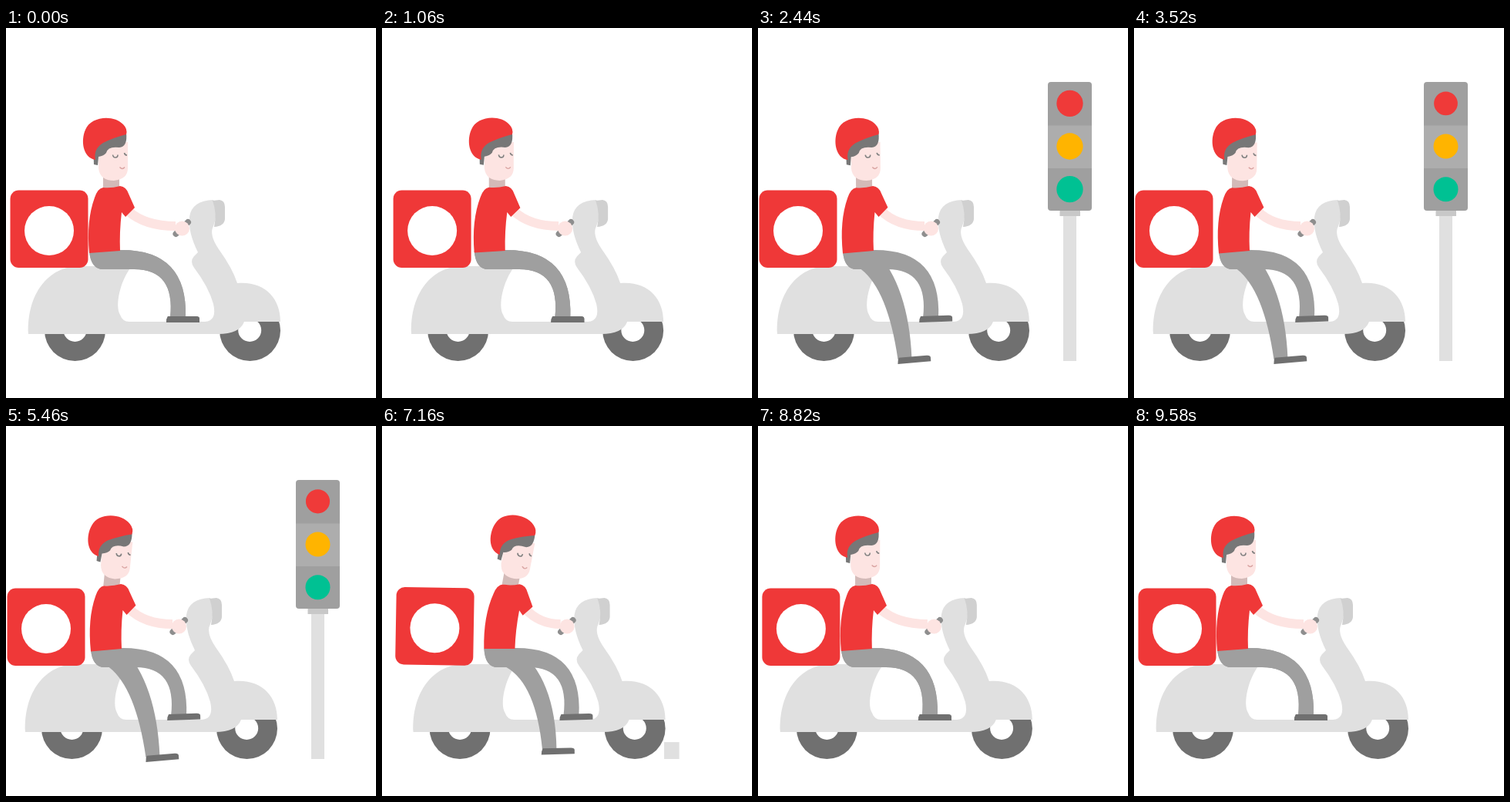
Recreate the animation shown at these times as an HTML page. Size 480 px wide and 480 px high, loop 9.6 s.

```html
<!DOCTYPE html>
<html lang="en">
<head>
<meta charset="utf-8">
<title>Delivery scooter</title>
<style>
  html, body { margin: 0; width: 100%; height: 100%; overflow: hidden; background: #fff; }
  svg { display: block; width: 100%; height: 100%; }
</style>
</head>
<body>
<svg viewBox="0 0 480 480">
  <g id="light">
    <rect id="pole" fill="#e0e0e0"/>
    <rect id="collar" x="-13" width="26.5" fill="#c8c8c8"/>
    <rect id="housing" x="-28.5" width="57" rx="4" fill="#9f9f9f"/>
    <rect id="middle" x="-28.5" width="57" fill="#adadad"/>
    <circle id="red" fill="#ef3a39"/>
    <circle id="amber" fill="#ffb400"/>
    <circle id="green" fill="#00c193"/>
  </g>

  <g id="scooter">
    <g id="wheels">
      <circle cx="89.5" cy="392.5" r="39.5" fill="#707070"/>
      <circle cx="89.5" cy="392" r="15" fill="#fff"/>
      <circle cx="316.5" cy="392.5" r="39.5" fill="#707070"/>
      <circle cx="316.2" cy="392" r="15" fill="#fff"/>
    </g>
    <g id="frame">
      <path fill="#e0e0e0" d="M29 397C27 345 55 309 95 309H163C148 328 141 360 148 372Q151 381 160 381H258Q274 380 269 358Q263 336 244 311Q238 303 244 296L249 291Q236 265 238 245Q241 224 269 223Q276 240 269 257Q263 268 276 287Q294 312 300 331C335 328 356 350 356 381H309Q303 397 275 397Z"/>
      <path fill="#d0d0d0" d="M268 224L277 223Q284 224 284 232V248Q283 257 270 258Q274 240 268 224Z"/>
      <g id="box">
        <rect x="5.500" y="210.500" width="101" height="100.500" rx="11" fill="#ef3838"/>
        <circle cx="56" cy="263" r="32" fill="#fff"/>
      </g>
      <path d="M220.500 267L236 252" stroke="#8e8e8e" stroke-width="8" stroke-linecap="round"/>
      <path id="arm" fill="none" stroke="#fde4e2" stroke-width="12"/>
      <circle cx="228.500" cy="260" r="9.500" fill="#fde4e2"/>
      <g id="rider">
        <g id="legs">
          <path id="groundLeg" fill="#9f9f9f"/>
          <path id="boardLeg" fill="#9f9f9f"/>
          <path id="groundShoe" fill="#707070" d="M0 6Q0 1 2 -2H38Q43 -2 43 1V6Z"/>
          <path id="boardShoe" fill="#707070" d="M0 6Q0 1 2 -2H38Q43 -2 43 1V6Z"/>
        </g>
        <g id="upperBody">
          <g id="head">
            <path fill="#d3bab8" d="M126 190H147V208H126Z"/>
            <path fill="#fde4e2" d="M120 160V182Q122 198 140 198Q158 196 158 182V148H130Z"/>
            <path fill="#777" d="M114 177Q112 160 122 145L156 136Q158 154 147 155Q132 153 130 162Q127 166 120 167L119 178Z"/>
            <path fill="#ef3838" d="M116 171C99 168 97 145 103 132C110 114 140 112 152 125Q158 131 156 138Q140 142 126 149Q113 157 116 171Z"/>
            <path fill="none" stroke="#808080" stroke-width="1.6" d="M138.500 164.500Q139 168 142 168Q145 168 145 164.500M153.500 162Q154 165 157 165"/>
            <path fill="none" stroke="#d9a3a1" stroke-width="1.4" d="M147.500 180.500Q151 184.500 154 180.500"/>
          </g>
          <path fill="#ef3838" d="M126 207Q137 208 148 205Q156 206 159 215L167 233L155 245L150 239Q147 265 148 289L108 292Q104 250 115 220Q119 208 126 207Z"/>
        </g>
      </g>
    </g>
  </g>
</svg>
<script>
const LOOP = 9600, GROUND = 432, POLE = 195, HOUSING = 167;
const $ = id => document.getElementById(id);
const set = (id, attrs) => {
  for (const name in attrs) $(id).setAttribute(name, attrs[name]);
};

const clamp = (v, low, high) => Math.min(high, Math.max(low, v));
const mix = (a, b, u) => a + (b - a) * u;
const progress = (t, start, end) => clamp((t - start) / (end - start), 0, 1);
const smooth = u => u * u * (3 - 2 * u);
const backIn = (u, pull) => u * u * ((pull + 1) * u - pull);
const backOut = (u, pull) => 1 - backIn(1 - u, pull);

// Rises from 0 to 1 between a and b, falls back between c and d.
const phase = (t, a, b, c, d) => smooth(progress(t, a, b)) - smooth(progress(t, c, d));

function drawLight(t) {
  const arrival = (1 - progress(t, 1300, 2190)) ** 2;
  const departure = Math.max(0, t - 6700) ** 2 * 0.000135;
  const rise = 1 - (1 - progress(t, 1300, 2050)) ** 2;
  const poleHeight = POLE * rise * (1 - backIn(progress(t, 6150, 7185), 2));
  const head = HOUSING * backOut(progress(t, 1780, 2400), 1) * (1 - backIn(progress(t, 6100, 7000), 2));
  const base = GROUND - poleHeight;
  const width = 20 - 3 * clamp(poleHeight / POLE, 0, 1);
  const middle = clamp(head - 55, 0, 55.5);

  set('light', { transform: `translate(${404.5 + 60 * arrival - departure})` });
  set('pole', { x: -width / 2, y: base, width, height: poleHeight });
  set('collar', { y: base, height: head > 0 ? 7 : 0 });
  set('housing', { y: base - head, height: head });
  set('middle', { y: base - 55 - middle, height: middle });

  const radius = 16 * backOut(progress(t, 2150, 2550), 1.7) * (1 - smooth(progress(t, 6250, 6600)));
  const beat = 1.2 + 2.3 * Math.sin(2 * Math.PI * (t - 3520) / 960 - 0.93);
  set('red', { cy: base - head * 5 / 6, r: Math.max(0, radius + beat * phase(t, 2600, 2900, 5900, 6100)) });
  set('amber', { cy: base - head / 2, r: radius });
  set('green', { cy: base - head / 6, r: radius });
}

// The same leg bends on the board (0) or stretches down to the ground (1).
function leg(u) {
  const at = (x0, y0, x1, y1) => `${mix(x0, x1, u)} ${mix(y0, y1, u)}`;
  return `M108 289L150 288Q${at(236, 288, 194, 335)} ${at(233, 376, 199, 429)}` +
    `L${at(213, 376, 181, 430)}Q${at(220, 311, 167, 340)} ${at(163, 313, 132, 313)}` +
    'L126 313Q110 313 108 289Z';
}

function drawScooter(t) {
  const brake = phase(t, 1450, 1900, 1900, 2300);
  const lurch = phase(t, 800, 1820, 1820, 2300);
  const surge = phase(t, 6800, 7600, 7750, 8160);
  const parked = phase(t, 1525, 2300, 7600, 8080);

  const drive = 16 * phase(t, 500, 1525, 1525, 2300) + 36.5 * surge - 4 * phase(t, 1525, 2300, 8160, 8900);
  const slide = 6 * parked + 16 * (lurch + surge);
  const lean = 4 * lurch + 4.8 * phase(t, 6800, 7160, 8080, 8900) - 0.6 * parked;
  const nod = 6.5 * phase(t, 3000, 4800, 8080, 8900) - 3 * lurch;
  const step = phase(t, 1950, 2400, 7000, 7600);

  set('scooter', { transform: `translate(${drive})` });
  set('frame', { transform: `rotate(${2 * brake} 316 392)` });
  set('box', { transform: `rotate(${4.2 * brake + 2.3 * surge} 106 311)` });
  set('rider', { transform: `translate(${slide})` });
  set('upperBody', { transform: `rotate(${lean} 148 289)` });
  set('head', { transform: `rotate(${nod} 137 200)` });

  const shoulder = 158 + slide + lean * 0.8;
  set('arm', { d: `M${shoulder} 237Q${shoulder + 22 - slide * 0.3} 257 220 257` });

  const drag = -0.0018 * slide;
  set('legs', { transform: `matrix(1 0 ${drag} 1 ${-drag * 289} 0)` });
  set('boardLeg', { d: leg(0) });
  set('groundLeg', { d: leg(step) });
  set('boardShoe', { transform: `translate(208 376) rotate(${-2 * step})` });
  set('groundShoe', {
    transform: `translate(${mix(208, 180.5, step)} ${mix(376, 430, step)}) rotate(${-5 * step ** 6})`
  });
}

function draw(now) {
  const t = now % LOOP;
  drawLight(t);
  drawScooter(t);
  requestAnimationFrame(draw);
}
requestAnimationFrame(draw);
</script>
</body>
</html>
```
